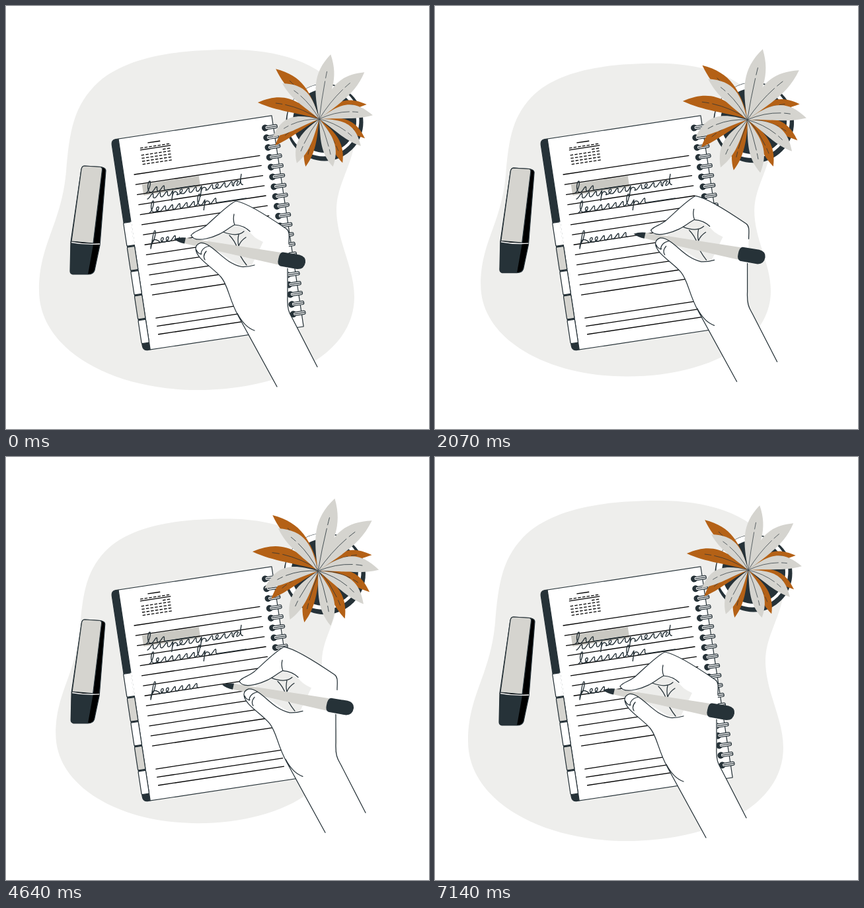
An HTML page that plays this animation: 640 px wide and 640 px high, repeating every 7.21 s.

```html
<!DOCTYPE html>
<html lang="en">
<head>
<meta charset="utf-8">
<title>Writing in a notebook</title>
<style>
  html, body { margin: 0; width: 100%; height: 100%; overflow: hidden; background: #fff; }
  svg { display: block; width: 100%; height: 100%; }
  .line { fill: none; stroke: #263238; stroke-width: 1.25; stroke-linecap: round; stroke-linejoin: round; }
  .ink { fill: none; stroke: #263238; stroke-width: 1.4; stroke-linecap: round; stroke-linejoin: round; }
  .dark { fill: #263238; }
  .grey { fill: #d5d4cf; }
  .white { fill: #fff; }
  .edge { stroke: #263238; stroke-width: 1.2; stroke-linejoin: round; }
  .rule { fill: none; stroke: #000; stroke-width: 1.3; stroke-linecap: round; }
  .dashed { stroke-dasharray: 4.5 2.2; stroke-linecap: butt; }
  .vein { fill: none; stroke: #263238; stroke-width: .7; stroke-linecap: round; }
</style>
</head>
<body>
<svg viewBox="0 0 640 640">
  <defs><clipPath id="written"><rect id="reveal" x="200" y="320" height="60"/></clipPath></defs>

  <path id="blob" fill="#eeeeec" d="M50 430C50 360 84 330 91 250C96 190 102 150 140 115C185 76 260 66 340 66C420 66 500 90 525 165C540 225 500 260 500 308C500 355 527 395 527 440C527 530 415 581 290 581C160 581 50 520 50 430Z"/>

  <g id="marker">
    <path class="edge" d="M119 242L144 243.500Q151 245 151 249L142 362L134 400Q132 406 124 406H101Q97 405 97 401L98 357L114 247Q115 242 119 242Z"/>
    <path class="grey edge" d="M119 242L143 243.500Q146 244 145.500 248L132 359L99 356L114 247Q115 242 119 242Z"/>
    <path class="dark" d="M98.500 358L132 361L124 406H101Q97 405 97 401Z"/>
    <path d="M99 357.500Q120 361.500 142 360" fill="none" stroke="#fff" stroke-width="1.4"/>
  </g>

  <g id="book" transform="translate(170 201) rotate(-8.6)"></g>
  <g id="notes" class="ink"></g>
  <g id="word" class="ink" clip-path="url(#written)"></g>

  <g id="pot">
    <circle class="dark" cx="482" cy="176" r="58.500"/>
    <circle class="white" cx="480" cy="173" r="54.500"/>
    <circle class="dark" cx="482" cy="174" r="48"/>
  </g>
  <g id="backLeaves"></g>
  <g id="frontLeaves"></g>

  <g id="hand">
    <path class="white" d="M410 576L352 470C337 443 337 425 326 411C314 396 296 384 289 373L300 352L330 318L348 295C365 298 405 324 424 337C430 341 428 350 428 360L426 440C425 462 430 466 434 474L471 546Z"/>
    <path fill="#ededeb" d="M303 352Q330 345 345 331Q358 334 372 345L389 357L372 392L356 394L318 370Z"/>
    <path class="white" d="M345 329Q358 332 369 341Q373 350 389 357L405 345L350 300Z"/>
    <path class="line" d="M338 347Q347 356 350 367T364 392M352 346Q350 354 352 363M363 350Q355 355 352 363M329 342Q350 350 360 341"/>
    <path class="grey" d="M271 350.500L416 373L412 391.500L269 359Z"/>
    <path class="dark" d="M254 352.500Q262 349.500 272 350.500L270 359.500Q261 358 254 352.500ZM419 372.500L444 376.500Q454 379 453 388Q451 399 440 398L415 393.500Q410 391 412 383Q414 372 419 372.500Z"/>
    <path class="white" d="M288 362Q296 356 307 363C322 372 334 388 356 395L340 430L326 411C314 396 287 382 287 367Z"/>
    <path class="white" d="M280 347C284 341 293 340 302 333C318 319 335 301 348 295L370 302L346 331C334 337 326 347 303 352Q284 356 280 347Z"/>
    <path class="line" d="M410 576L352 470C337 443 337 425 326 411C314 396 287 382 287 367Q287 361 294 358.500Q301 358 309 364C324 374 334 389 356 394.500Q366 395 376 392
      M376 491Q361 486 350 465
      M346 331C334 337 326 347 303 352Q284 356 280 347C284 341 293 340 302 333C318 319 335 301 348 295C365 298 405 324 424 337C430 341 428 350 428 360M426 397V440C425 462 430 466 434 474L471 546
      M345 315Q343 324 346 331Q360 332 369 341M295 376Q295 366 308 363M301 384Q297 378 303 371M288 369Q291 376 296 375"/>
  </g>
</svg>
<script>
const LOOP = 7210, STEPS = 101, TAU = 2 * Math.PI;
const $ = id => document.getElementById(id);

function add(parent, tag, attrs) {
  const node = document.createElementNS('http://www.w3.org/2000/svg', tag);
  for (const key in attrs) node.setAttribute(key, attrs[key]);
  $(parent).append(node);
}

function repeat(count, first, gap, make) {
  for (let i = 0; i < count; i++) make(first + gap * i, i);
}

// Notebook, drawn upright in its own tilted frame.
const pageW = 234.6, pageH = 322.6;
const rule = (x, y, length, style = '') =>
  add('book', 'path', { class: 'rule ' + style, d: `M${x} ${y}h${length}` });

add('book', 'path', { class: 'dark edge', d: `M0 0V${pageH}H-4Q-11 ${pageH} -11 ${pageH - 8}V8Q-11 0 -4 0Z` });
add('book', 'rect', { class: 'white edge', width: pageW, height: pageH });
repeat(5, 127, 37.3, (y, i) =>
  add('book', 'rect', { class: (i % 2 ? 'grey' : 'white') + ' edge', x: -11.5, y, width: 11.5, height: 35.5, rx: 1.5 }));
add('book', 'path', { d: 'M0 127V162', stroke: '#fff', 'stroke-width': 2 });
add('book', 'rect', { fill: '#c9c8c2', x: 25, y: 73.5, width: 87, height: 17 });
repeat(13, 57, 15.35, y => rule(15.7, y, 192));
repeat(3, 276.5, 12.5, y => rule(15.7, y, 192));

// Small calendar at the top of the page.
rule(43.5, 12.6, 18);
rule(30.5, 18.8, 46, 'dashed');
rule(30.5, 21.6, 46);
rule(64, 25.6, 12, 'dashed');
repeat(4, 29.8, 4.6, y => rule(30.5, y, 45.5, 'dashed'));

repeat(20, 16.8, 15, y => {
  add('book', 'circle', { class: 'dark', cx: 222, cy: y, r: 5 });
  add('book', 'rect', { class: 'white edge', x: 222, y: y - 2.6, width: 18.5, height: 5.2, rx: 2.2 });
  add('book', 'path', { class: 'line', d: `M224 ${y}h15.5` });
});

// Handwriting: each letter is a pen stroke that joins on to the next.
const strokes = {
  n: 'c3 0 7-7 9-7s-2 7 2 7',
  e: 'c6 0 9-7 6-7s-5 7 2 7',
  l: 'c5-2 11-17 8-17s-8 17 0 17',
  p: 'c3 0 6-7 7-7l-4 15c2-9 5-15 9-12s-3 5 2 4',
  d: 'c0-7 7-8 8-6c-6 7-3 8 2 3l4-13c-3 9-4 16 0 16',
  f: 'c5-3 11-19 8-19s-9 26-10 26c1-8 5-16 12-11s-2 4 2 4',
  '-': 'l22 0',
};
const scrawl = (parent, x, y, letters) => add(parent, 'path', {
  transform: `translate(${x} ${y}) rotate(-8.6)`,
  d: 'M0 0' + [...letters].map(c => strokes[c]).join(''),
});
scrawl('notes', 212, 283, 'lnn--');
scrawl('notes', 214, 292, 'nnnpennpnennd');
scrawl('notes', 217, 313, 'lennnnnlpn--');
scrawl('word', 220, 360, 'feennnn');

// A pointed leaf; leaves near `longest` reach further, sideways ones arch upwards.
function leaf(parent, fill, degrees, longest, plump) {
  const angle = degrees * TAU / 360;
  const len = 75 + 26 * Math.max(0, Math.cos(angle - longest * TAU / 360)) ** 2;
  const arch = -11 * Math.cos(angle), width = len * plump;
  const [ux, uy] = [Math.cos(angle), Math.sin(angle)];
  const at = (along, side) => [474 + ux * len * along - uy * side, 171 + uy * len * along + ux * side];
  const side = w => [at(.4, arch + w * .7), at(.66, arch + w * 1.1)];
  const [a, b] = side(width), [c, d] = side(-width);
  add(parent, 'path', { fill, d: `M474 171C${a} ${b} ${at(1, 0)}C${d} ${c} 474 171Z` });
  add(parent, 'path', {
    class: 'vein', 'stroke-dasharray': `${len * .58} 5 ${len * .1} 99`,
    d: `M474 171Q${at(.45, arch * 1.3)} ${at(.87, arch * .3)}`,
  });
}
[229, 195, 149, 106, 62, 23, -17, -75].forEach(a => leaf('backLeaves', '#b46116', a, 220, .15));
[117, 33, 74, 159, 224, -4, -46, -80].forEach(a => leaf('frontLeaves', '#d5d4cf', a, -65, .19));

function ease(s) {
  s = Math.max(0, Math.min(1, s));
  return s * s * s * (10 - 15 * s + 6 * s * s);
}

function zoom(id, cx, cy, scale, turn = 0) {
  $(id).setAttribute('transform', `translate(${cx} ${cy}) rotate(${turn}) scale(${scale}) translate(${-cx} ${-cy})`);
}

function draw(t) {
  const swell = (1 - Math.cos(TAU * t / LOOP)) / 2;
  zoom('blob', 290, 326, 1 - .13 * swell);
  zoom('marker', 124, 334, 1 - .054 * swell);
  zoom('pot', 480, 168, 1 + .07 * swell);
  zoom('backLeaves', 466, 166, 1 + .118 * swell, .6 * swell);
  zoom('frontLeaves', 482, 157, 1 + .166 * swell, 3.7 * swell);

  // The hand writes to the right with a slight bob, then glides back.
  const stay = 1 - ease((t - 4650) / 2490);
  const x = 73 * ease(t / 3600) * stay;
  const bob = 6.2 + 1.5 * Math.cos(TAU * (t - 2070) / 1285);
  const y = -bob * ease(t / 1100) * stay;
  $('hand').setAttribute('transform', `translate(${x} ${y})`);
  $('reveal').setAttribute('width', 63 + x);
}

const start = performance.now();
function tick() {
  const phase = (performance.now() - start) % LOOP / LOOP;
  draw(Math.min(STEPS - 1, Math.floor(phase * STEPS + .1)) * LOOP / STEPS);
  requestAnimationFrame(tick);
}
tick();
</script>
</body>
</html>
```
